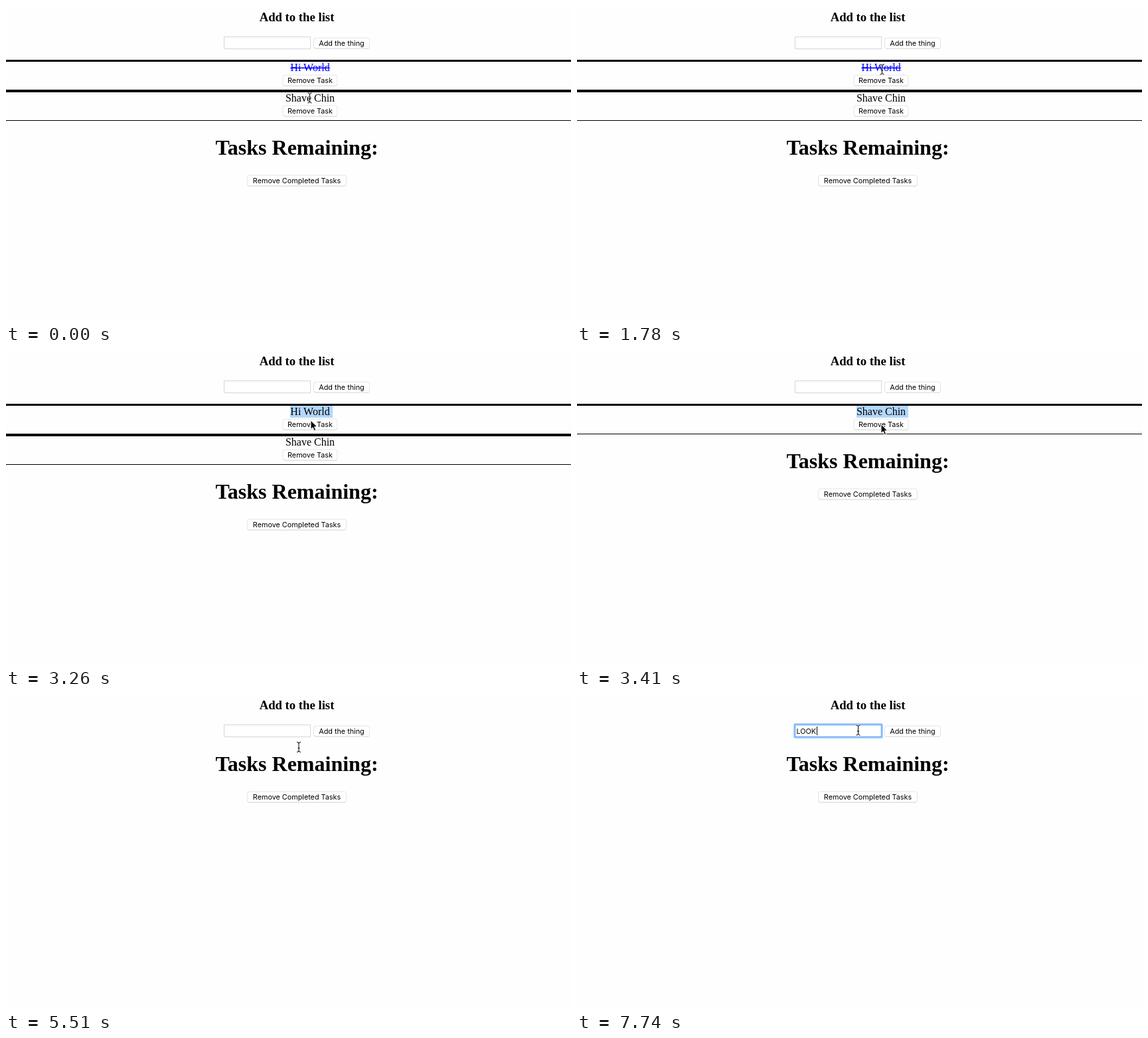
An HTML page that plays this animation: 851 by 476 pixels, repeating every 8000 ms.

```html
<!DOCTYPE html>
<html lang="en">
<head>
<meta charset="utf-8">
<title>Task list</title>
<style>
  html, body { margin: 0; width: 100%; height: 100%; overflow: hidden; background: #fefefe; }
  svg { display: block; }
  text { text-anchor: middle; font: 16px "Liberation Serif", "Times New Roman", serif; white-space: pre; }
  .h1 { font-size: 32px; font-weight: bold; }
  .h3 { font-size: 18.72px; font-weight: bold; }
  .ui { font: 10.8px Inter, "Open Sans", sans-serif; }
  .done { fill: #00f; text-decoration: line-through; }
</style>
</head>
<body>
<svg id="stage" width="851" height="476" viewBox="0 0 851 476">
  <defs>
    <linearGradient id="press" x2="0" y2="1">
      <stop offset="0" stop-color="#4593f7"/><stop offset=".5" stop-color="#2f80f3"/>
      <stop offset=".5" stop-color="#0f69ee"/><stop offset="1" stop-color="#0560ee"/>
    </linearGradient>
  </defs>
  <g id="page"></g>
</svg>
<script>
const LOOP = 8000;
const page = document.getElementById('page');

// Pointer stops: time, x, y
const pointer = [
  [0, 457.5, 138.5], [1490, 458, 130], [1640, 459, 110], [1780, 459.5, 95.5],
  [2970, 459.5, 98], [3120, 459, 106], [3270, 458, 112],
  [4910, 458.5, 113.5], [5210, 456, 108], [5360, 450, 96], [5500, 441, 80],
  [5650, 431, 65], [5800, 424, 55], [5950, 423.5, 54.5]
];
const typing = [[0, ''], [7000, 'L'], [7150, 'LO'], [7590, 'LOO'], [7740, 'LOOK']];

const latest = (list, t) => list.filter(item => item[0] <= t).pop();
const within = (t, from, to) => t >= from && t < to;

const rect = (x, y, w, h, fill, extra = '') =>
  `<rect x="${x}" y="${y}" width="${w}" height="${h}" fill="${fill}" ${extra}/>`;
const text = (x, y, label, cls = '') => `<text x="${x}" y="${y}" class="${cls}">${label}</text>`;

function button(cx, cy, w, label, pressed) {
  const x = cx - w / 2, y = cy - 8;
  const body = pressed
    ? rect(x - .5, y - .5, w + 1, 17, 'url(#press)', 'rx="3"')
    : rect(x, y + .8, w, 16, '#d2d2d2', 'rx="3.5"') +
      rect(x, y, w, 16, '#fff', 'rx="3.5" stroke="#e4e4e4"');
  return body + text(cx, cy + 4, label, 'ui');
}

function task(top, { label, done, selection, selectColor = '#b3d7ff', pressed }) {
  const mark = selection ? rect(selection[0], top + 3, selection[1] - selection[0], 18, selectColor) : '';
  return rect(0, top, 851, 3, '#000') + mark +
    text(458, top + 17, label, done ? 'done' : '') +
    button(458, top + 31, 82, 'Remove Task', pressed) +
    rect(0, top + 45, 851, 1, '#000');
}

function tasksAt(t) {
  const tasks = [];
  if (t < 3410) tasks.push({
    label: 'Hi World',
    done: t < 1930 || within(t, 2230, 2680),
    selection: t >= 2680 ? [428, 492] : t >= 2230 ? [448, 488] : null,
    pressed: t >= 3270
  });
  if (t < 5060) tasks.push({
    label: 'Shave Chin',
    done: within(t, 300, 600) || within(t, 900, 1340),
    selection: t >= 3410 ? [421, 499] : null,
    selectColor: t >= 4910 ? '#b0c5df' : '#b3d7ff',
    pressed: t >= 4910
  });
  return tasks;
}

function input(t) {
  const focused = t >= 5950;
  const value = latest(typing, t)[1];
  const caret = focused && !within(t, 6400, 6850);
  const caretX = 331.5 + [0, 6, 14, 22, 30][value.length];
  let out = focused
    ? rect(327.5, 45.5, 132, 20, '#fff', 'rx="1.5" stroke="#a9d1fb" stroke-width="3"') +
      rect(328.5, 46.5, 130, 18, '#fff', 'stroke="#6fb1f5" stroke-width="1.6"')
    : rect(328.5, 46.5, 130, 18, '#fff', 'stroke="#d6d6d6"');
  if (value) out += `<text x="330.5" y="60" class="ui" style="text-anchor:start">${value}</text>`;
  if (caret) out += rect(caretX - .5, 49, 1, 13, '#000');
  return out;
}

function cursor(t) {
  const [, x, y] = latest(pointer, t);
  const arrow = within(t, 3120, 4910);
  const shape = arrow
    ? '<path d="M0 0V13.5L3.1 10.6 5.3 15.6 7.6 14.6 5.5 9.7H9.7Z" stroke="#fff" stroke-linejoin="round"/>'
    : ['#fff" stroke-opacity=".7" stroke-width="2.4', '#000'].map(color =>
        `<path d="M-3-7.5Q0-7.5 0-5.5 0-7.5 3-7.5M0-5.5V5.5M-3 7.5Q0 7.5 0 5.5 0 7.5 3 7.5M-1.5 1.5H1.5" fill="none" stroke="${color}"/>`).join('');
  return `<g transform="translate(${x} ${y})">${shape}</g>`;
}

function scene(t) {
  const tasks = tasksAt(t);
  const shift = tasks.length ? tasks.length * 46 + 16 : 0;
  return text(438, 23, 'Add to the list', 'h3') +
    input(t) +
    button(505.5, 56, 84, 'Add the thing') +
    tasks.map((item, i) => task(81 + 46 * i, item)).join('') +
    text(438, 116 + shift, 'Tasks Remaining:', 'h1') +
    button(438, 155 + shift, 149, 'Remove Completed Tasks') +
    cursor(t);
}

let shown;
const start = performance.now();
function tick() {
  const next = scene((performance.now() - start) % LOOP);
  if (next !== shown) page.innerHTML = shown = next;
  requestAnimationFrame(tick);
}
tick();
</script>
</body>
</html>
```
